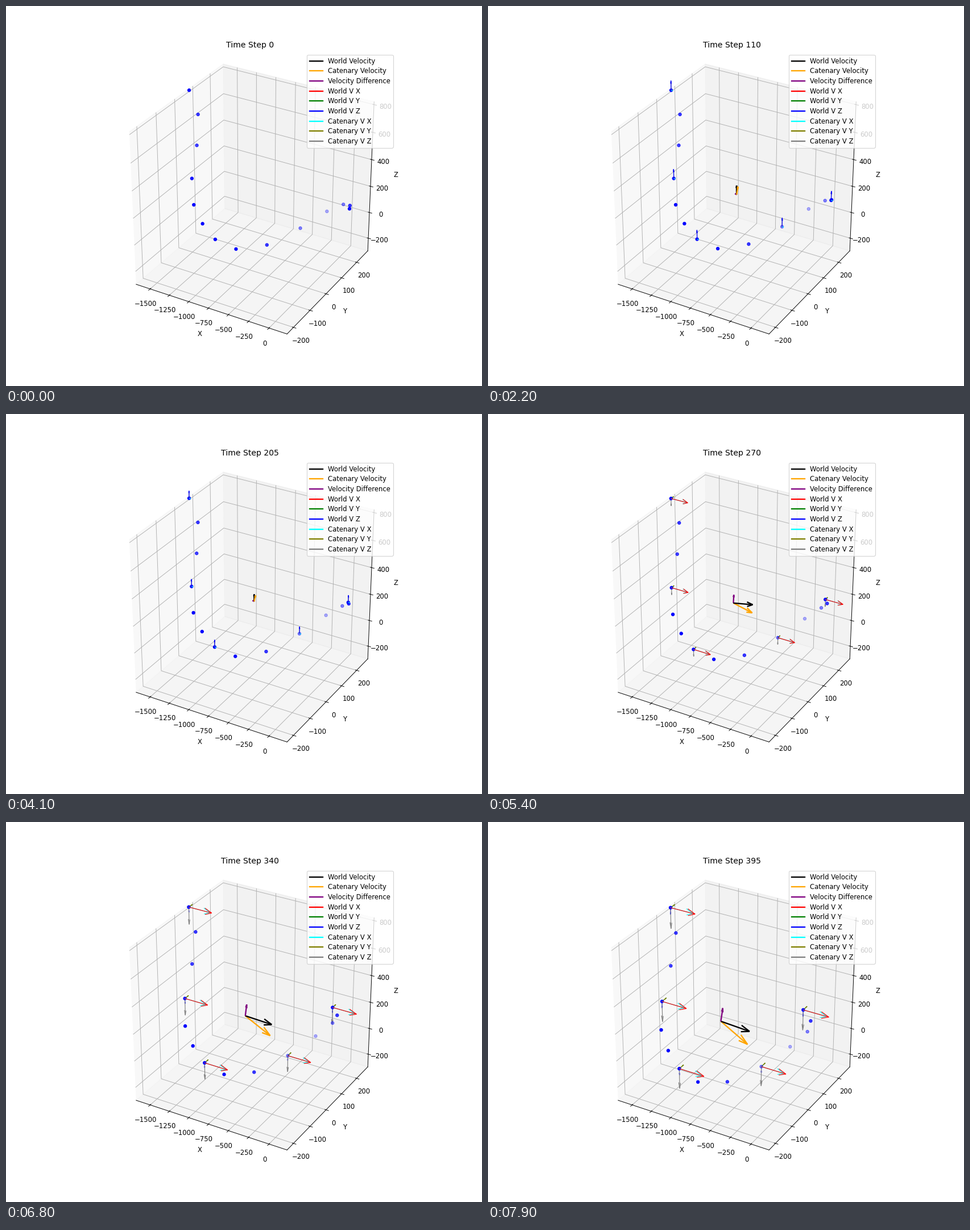
A matplotlib script that plays this animation: 837 by 669 pixels, repeating every 8 s.

```python
import numpy as np
import matplotlib.pyplot as plt
from matplotlib.animation import FuncAnimation
from matplotlib.lines import Line2D

W, H, DPI = 837, 669, 83.7
FRAMES, INTERVAL = 80, 100
SURGE_START, SURGE_TIME = 4.1, 3.8

LOW = np.array([-1685.0, -238.0, -299.5])
HIGH = np.array([218.0, 276.6, 820.5])

# Default 3D camera: 30 deg elevation, -60 deg azimuth, distance 10
SCALE = 0.77 * H / 0.185
CX = 0.5125 * W + (0.095 - 0.0925) * SCALE
CY = 0.89 * H - 0.095 * SCALE
CUBE = 1.10025
ELEV, AZIM = np.radians([30, -60])
TOWARD = np.array([np.cos(ELEV) * np.cos(AZIM), np.cos(ELEV) * np.sin(AZIM), np.sin(ELEV)])
RIGHT = np.array([-np.sin(AZIM), np.cos(AZIM), 0])
UP = np.cross(TOWARD, RIGHT)

NODE = np.arange(14)
S = NODE / 13

LEGEND = [
    ("World Velocity", "black"), ("Catenary Velocity", "orange"),
    ("Velocity Difference", "purple"), ("World V X", "red"),
    ("World V Y", "green"), ("World V Z", "blue"),
    ("Catenary V X", "cyan"), ("Catenary V Y", "olive"),
    ("Catenary V Z", "gray"),
]


def curve(start, end, *amps):
    """Straight run along the cable plus sine harmonics."""
    waves = sum(a * np.sin(k * np.pi * S) for k, a in enumerate(amps, 1))
    return start + (end - start) * S + waves


def bump(center, width):
    return np.exp(-((NODE - center) / width) ** 2)


# Cable on the view plane (pixels), its drift shape and relative depth
REST_X = curve(322, 604, -53.6, -39.8, 25.6, 0.7, 2.1, 3.7, 2.1)
REST_Y = curve(148.3, 357, 147.8, 21.3, -23, 4.3, -1.8, -5.4)
DRAG_X = curve(-1, -47.5, -6, -6.3, 4, -3.2, 2)
DRAG_Y = curve(2.5, 0, 32, -15.4, 4.6, 0, -1.4)
LIFT = S ** 4.8
DEPTH = 0.4 * bump(1.6, 1.4) + bump(10, 1.9)


def surge(t):
    """Progress of the forward move, 0 to 1."""
    return np.clip((t - SURGE_START) / SURGE_TIME, 0, 1)


def unproject(px, py):
    """Data coordinates of view-plane pixels at the cable's depth."""
    dist = 10.01 + 0.39 * DEPTH
    u = (px - CX) / SCALE * dist
    v = (CY - py) / SCALE * dist
    p = np.outer(u, RIGHT) + np.outer(v, UP) + np.outer(10 - dist, TOWARD)
    return (LOW + HIGH) / 2 + p / CUBE * (HIGH - LOW)


def cable(t):
    lift = 32 * (1 - abs(1 - t / 6.1) ** 1.4)
    drag = surge(t) ** 1.6
    sway = 2.2 * min(t / SURGE_START, 1) ** 2
    return unproject(REST_X + drag * DRAG_X - sway * S,
                     REST_Y + drag * DRAG_Y - lift * LIFT)


def velocities(t):
    """World and catenary velocity vectors."""
    q = surge(t)
    on = min(t / 0.3, 1)
    vx = 330 * (1 - np.exp(-3.1 * q))
    vy = 24 * np.sqrt(q)
    vz = on * (70 - 122 / (1 + np.exp(-1.45 * (t - 5.4))))
    world = np.array([vx, vy, vz])
    cat = np.array([0.92 * vx + 18 * on * (1 - q), vy, vz - 5 * on - 98 * np.sqrt(q)])
    return world, cat


fig = plt.figure(figsize=((W + 0.001) / DPI, (H + 0.001) / DPI), dpi=DPI)
ax = fig.add_subplot(projection="3d")
ax.set_box_aspect((1, 1, 1))
ax.set(xlim=(LOW[0], HIGH[0]), ylim=(LOW[1], HIGH[1]), zlim=(LOW[2], HIGH[2]),
       xlabel="X", ylabel="Y", zlabel="Z")
ax.legend(handles=[Line2D([], [], color=c, lw=2, label=name) for name, c in LEGEND],
          loc="upper right", labelspacing=0.4)

drawn = []


def arrows(points, vec, color, lw):
    if np.linalg.norm(vec) < 1:
        return
    vecs = np.tile(vec, (len(points), 1))
    drawn.append(ax.quiver(*points.T, *vecs.T, color=color, linewidth=lw))


def update(frame):
    while drawn:
        drawn.pop().remove()
    t = frame * INTERVAL / 1000
    pts = cable(t)
    world, cat = velocities(t)

    drawn.append(ax.scatter(*pts.T, color="blue", s=20))
    center = pts.mean(axis=0, keepdims=True)
    for vec, color in ((world, "black"), (cat, "orange"), (world - cat, "purple")):
        arrows(center, vec, color, 2)

    tagged = pts[[0, 3, 6, 9, 13]]
    for vec, colors in ((world, ("red", "green", "blue")),
                        (cat, ("cyan", "olive", "gray"))):
        for axis, color in zip(np.eye(3), colors):
            arrows(tagged, vec * axis, color, 1)
    ax.set_title(f"Time Step {frame * 5}")
    return drawn


anim = FuncAnimation(fig, update, frames=FRAMES, interval=INTERVAL,
                     repeat=True, repeat_delay=0, blit=False)
plt.show()
```
